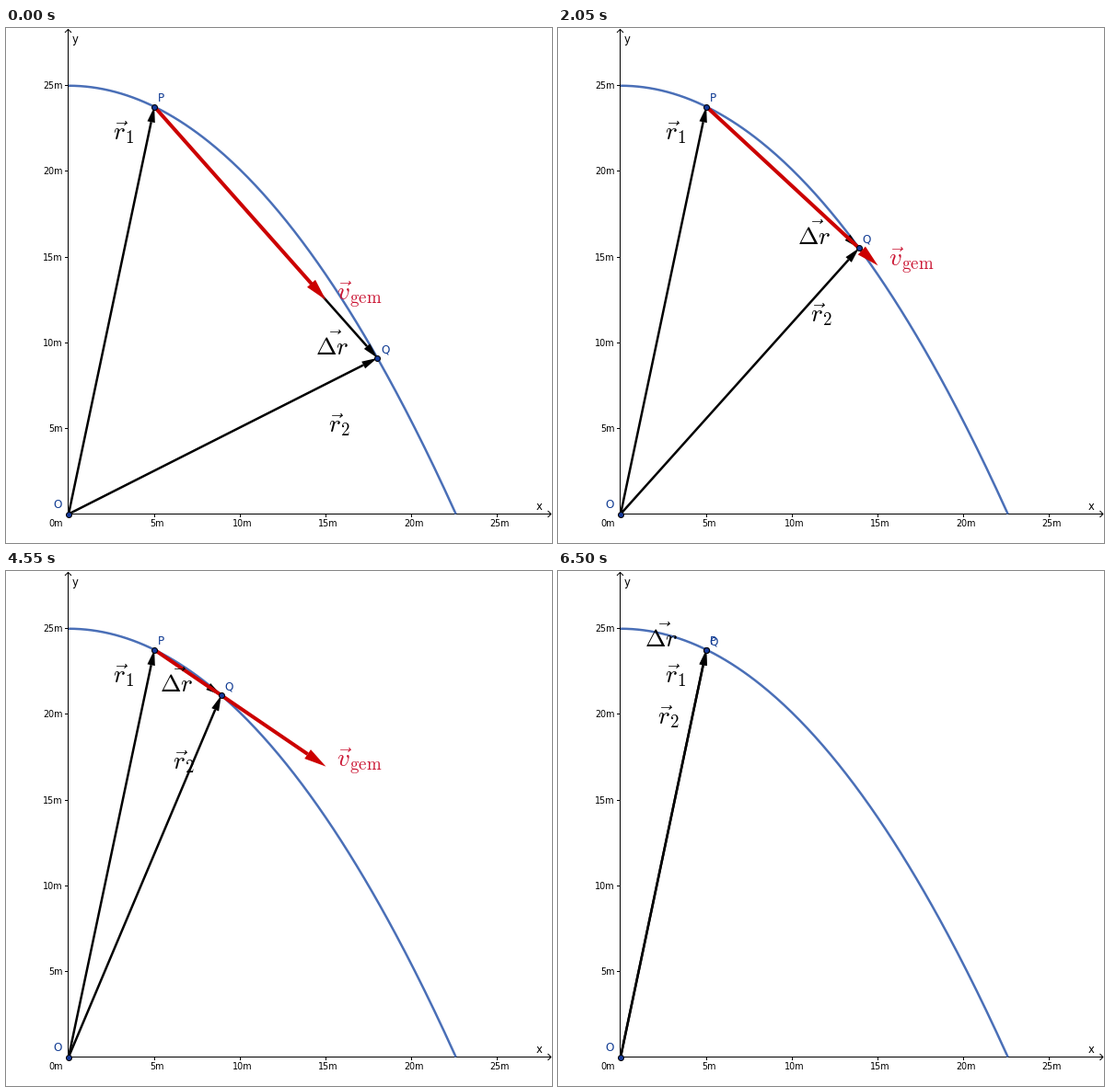
A matplotlib script for the animation above (6.55 s loop, 593 by 560 pixels).

```python
import numpy as np
import matplotlib.pyplot as plt
from matplotlib.animation import FuncAnimation

W, H, DPI = 593, 560, 64
PX = 72 / DPI                    # points per pixel
X0, Y0, UNIT = 68, 528.5, 18.63
AXIS_X, AXIS_Y = 67.5, 528.5     # axes lie on pixel centres
H0, V0, G = 25, 10, 9.81         # start height, speed, gravity
FRAMES = 131

BLUE, NAVY, RED, CRIMSON = "#4a6fb7", "#0f3a92", "#cc0000", "#cb1634"

plt.rcParams["mathtext.fontset"] = "cm"
plt.rcParams["font.family"] = "DejaVu Sans"

fig = plt.figure(figsize=(W / DPI, H / DPI), dpi=DPI, facecolor="white")
ax = fig.add_axes([0, 0, 1, 1])
ax.set_xlim(0, W)
ax.set_ylim(H, 0)
ax.axis("off")


def screen(x, y):
    return np.array([X0 + UNIT * x, Y0 - UNIT * y])


def height(x):
    return H0 - G / 2 * (x / V0) ** 2


def line(xs, ys, color="black", width=1.0, z=1):
    return ax.plot(xs, ys, color=color, lw=width * PX, zorder=z, snap=False,
                   solid_capstyle="butt", solid_joinstyle="miter")[0]


def label(x, y, text, size, color="black", ha="left", z=6):
    return ax.text(x, y, text, fontsize=size * PX, color=color, ha=ha,
                   va="baseline", zorder=z)


def dot(pos):
    return ax.plot(*pos, "o", ms=6 * PX, mfc="#15399a", mec="black",
                   mew=1 * PX, zorder=5, snap=False)[0]


class Arrow:
    def __init__(self, color, width, head, z):
        self.head = head
        self.shaft = line([], [], color, width, z)
        self.tip = ax.fill([0, 0, 0], [0, 0, 0], color=color, lw=0, zorder=z)[0]

    def set(self, a, b):
        d = b - a
        length = np.hypot(*d)
        self.show(length > 0.01)
        if length <= 0.01:
            return
        u = d / length
        base = b - u * min(self.head, length)
        side = np.array([-u[1], u[0]]) * self.head / 4
        self.shaft.set_data(*zip(a, base))
        self.tip.set_xy([b, base + side, base - side])

    def show(self, on):
        self.shaft.set_visible(on)
        self.tip.set_visible(on)


# axes
line([AXIS_X, AXIS_X], [AXIS_Y, 1])
line([AXIS_X, W - 1], [AXIS_Y, AXIS_Y])
line([AXIS_X - 3.5, AXIS_X, AXIS_X + 3.5], [5, 1.5, 5])
line([W - 4.5, W - 1, W - 4.5], [AXIS_Y - 3.5, AXIS_Y, AXIS_Y + 3.5])
label(72, 16, "y", 11.5)
label(576, 524, "x", 11.5)
label(61.5, 542, "0m", 9.6, ha="right")
for m in range(5, 30, 5):
    x, y = np.floor(screen(m, m)) + 0.5
    line([x, x], [AXIS_Y, AXIS_Y + 3.5])
    line([AXIS_X - 3.5, AXIS_X], [y, y])
    label(x + 2.5, 542, f"{m}m", 9.6, ha="center")
    label(61.5, y + 3.5, f"{m}m", 9.6, ha="right")

# trajectory
t = np.linspace(0, V0 * np.sqrt(2 * H0 / G), 200)
line(*screen(t, height(t)), BLUE, 2.5, 2)

O, P = screen(0, 0), screen(5, height(5))
r1, r2, dr = (Arrow("black", 2.5, 17, 3) for _ in range(3))
vel = Arrow(RED, 4, 24, 4)
r1.set(O, P)
dot(O)
dot(P)
q_dot = dot(P)
label(51, 522, "O", 12, NAVY)
label(P[0] + 3.6, P[1] - 5.5, "P", 12, NAVY)
label(116.2, 121, r"$\vec{r}_1$", 27)

q_text = label(0, 0, "Q", 12, NAVY)
r2_text = label(0, 0, r"$\vec{r}_2$", 27)
dr_text = label(0, 0, r"$\vec{\Delta r}$", 27)
v_text = label(0, 0, r"$\vec{v}_{\mathrm{gem}}$", 27, CRIMSON)


def update(i):
    xq = 18 - i / 10
    q = screen(xq, height(xq))
    r2.set(O, q)
    dr.set(P, q)
    q_dot.set_data([q[0]], [q[1]])
    q_text.set_position(q + (3.6, -5.5))
    r2_text.set_position(q + (-53.2, 80.5))
    dr_text.set_position(q + (-67, -3))

    moving = i < FRAMES - 1
    slope = -G / 2 / V0 ** 2 * (xq + 5)
    tip = P + UNIT * V0 * np.array([1, -slope])
    vel.set(P, tip)
    vel.show(moving)
    v_text.set_position(tip + (11.2, 1))
    v_text.set_visible(moving)
    return []


anim = FuncAnimation(fig, update, frames=FRAMES, interval=50, repeat=True,
                     repeat_delay=0, blit=False)
plt.show()
```
